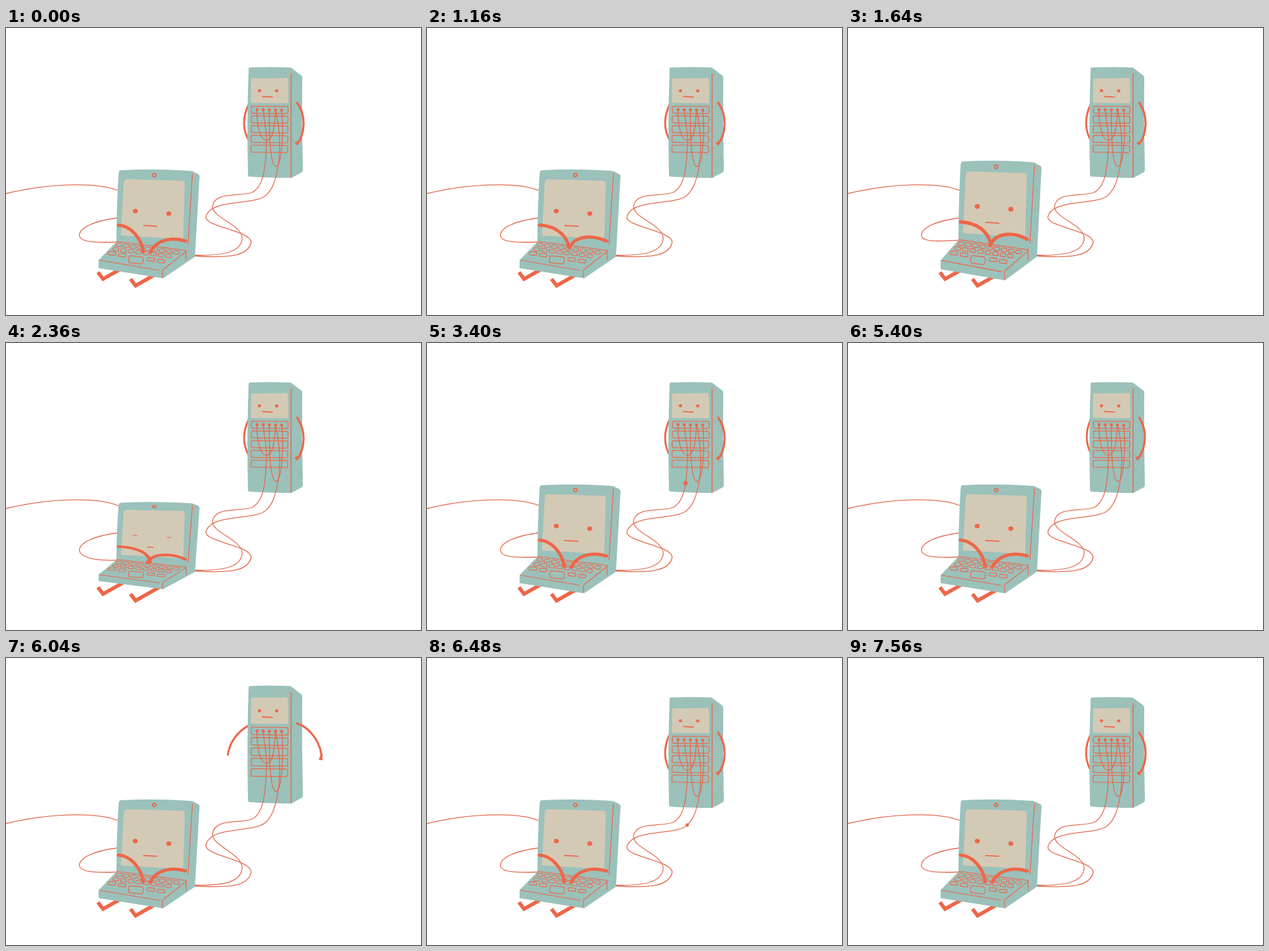
Recreate the animation shown at these times as an HTML page. Size 650 by 450 pixels, loop 7.96 s.

```html
<!DOCTYPE html>
<html lang="en">
<head>
<meta charset="utf-8">
<title>Laptop and server</title>
<style>
  html, body { margin: 0; width: 100%; height: 100%; overflow: hidden; background: #fff; }
  svg { display: block; width: 650px; height: 450px; }
  .body { fill: #9bc1bb; }
  .screen { fill: #d3cab5; stroke: #d3cab5; stroke-width: 4; stroke-linejoin: round; }
  .ink { fill: #ee6648; }
  .line { fill: none; stroke: #ee6648; stroke-width: 1.2; }
  .cable { fill: none; stroke: #e2694c; stroke-width: 1.3; }
  .limb { fill: none; stroke: #ee6648; stroke-width: 5; stroke-linecap: round; }
  .speck { fill: #c1937c; opacity: .55; }
</style>
</head>
<body>
<svg viewBox="0 0 650 450">
  <path class="cable" d="M0,259.5 C60,245 138,240 176,255 L190,264"/>
  <path class="cable" id="loop"/>

  <g id="server">
    <path class="limb" id="armL" stroke-width="3" style="stroke-width:3" d="M380,120 C371,139 371,158 379,174"/>
    <path class="body" d="M381,62 Q414,60.500 446,62 L462,74 Q464,75 464,79 Q463,150 465,222 Q465,226 462,227 L447,235 Q412,235 381,233 Q379,233 379,229 Q377,148 380,64 Z"/>
    <g id="specksS"></g>
    <path class="screen" d="M386,81 L439.500,80.500 L440,116 L385.500,115.500 Z"/>
    <path class="line" style="stroke-width:1.5" d="M446.500,71 V234.500"/>
    <g id="slots"></g>
    <g id="plugs"></g>
    <path class="cable" d="M393,129 C393,160 400,176 408,176 C417,176 421,160 422,129"/>
    <path class="cable" d="M412.500,129 C412,170 414,217 423,217 C432,217 435,165 432,129"/>
    <path class="limb" id="armR" style="stroke-width:3.2" d="M456,117 C470,136 469,165 456,182 L454.500,180.500 L460,177"/>
    <g id="faceS"></g>
  </g>

  <path class="cable" id="cableA"/>
  <path class="cable" id="cableB"/>
  <circle class="ink" id="packet"/>

  <g class="limb" style="stroke-width:5.800;stroke-linecap:butt">
    <path d="M144,383 L152,393.500 L192,371"/>
    <path d="M195,393.500 L203,404 L246,379.500"/>
  </g>

  <g id="laptop">
    <path class="body" d="M180,223 Q235,220 289,224 Q293,224 295,226 L301,229 Q304,231 303,235 L296,357 Q296,359 294,360 L246,392.500 L145,376.500 L145,364 L173,335 Q173,280 176.500,227 Q177,223 180,223 Z"/>
    <g id="specksL"></g>
    <path class="screen" d="M190,239 Q187,239 186.500,242 L182,323.500 Q230,325 275.500,330 L278,244 Q278,241.500 275,241.500 Z"/>
    <path class="line" d="M292,228 L285,340 M173,334.500 L283,349 M146,364 L240,380 M245,379.500 L282,350.500 M245,380 V391.500 M282,348 V364"/>
    <circle class="line" style="stroke-width:1.700" cx="232.300" cy="230.500" r="2.600"/>
    <g id="keys"></g>
    <g id="faceL"></g>
    <path class="limb" id="handL"/>
    <path class="limb" id="handR"/>
  </g>
</svg>
<script>
const LOOP = 7960, STEP = 40;
const $ = id => document.getElementById(id);
const set = (el, attrs) => { for (const k in attrs) el.setAttribute(k, attrs[k]); return el; };
const add = (parent, tag, attrs) =>
  $(parent).appendChild(set(document.createElementNS('http://www.w3.org/2000/svg', tag), attrs));

// Static details
const key = (x, y, w, h, rx = 2.2) => add('keys', 'rect', {
  class: 'line', x: x - w / 2, y: y - h / 2, width: w, height: h, rx,
  transform: `rotate(6 ${x} ${y})`
});
for (let i = 0; i < 9; i++) key(177 + i * 11.25, 340 + i * 1.5, 9, 5);
for (let i = 0; i < 8; i++) key(172 + i * 11.8, 347 + i * 1.5, 9, 5);
[[166, 353.5], [182, 356], [227, 363], [243, 365.5]].forEach(([x, y]) => key(x, y, 12, 5));
key(203.5, 363.5, 23, 11, 3.5);

for (let i = 0; i < 5; i++) {
  add('slots', 'rect', { class: 'line', x: 384, y: 122.8 + i * 15.3, width: 57.5, height: 11, rx: 2.5, transform: 'rotate(.6 412 160)' });
  add('plugs', 'circle', { class: 'ink', cx: 393.3 + i * 9.6, cy: 128 + i * .2, r: 2.4 });
}

let seed = 7;
const rand = () => (seed = seed * 16807 % 2147483647) / 2147483647;
function specks(id, n, x, y, w, h) {
  while (n--) add(id, 'ellipse', {
    class: 'speck', cx: x + rand() * w, cy: y + rand() * h, rx: .4 + rand() * .8, ry: .4 + rand() * .7
  });
}
specks('specksS', 18, 384, 65, 72, 12);
specks('specksS', 24, 449, 77, 13, 145);
specks('specksS', 14, 382, 198, 60, 32);
specks('specksL', 10, 270, 226, 28, 10);
specks('specksL', 10, 293, 236, 7, 60);

// Faces: round eyes that close to short dashes, plus a mouth
function face(id, [x1, y1], [x2, y2], r, [mx, my], mouth, small) {
  const eyes = [[x1, y1], [x2, y2]].map(([cx, cy]) => [
    add(id, 'ellipse', { class: 'ink', cx, cy, rx: r, ry: r * .9 }),
    add(id, 'path', { class: 'line', d: `M${cx - r},${cy} l${2 * r},.6` })
  ]);
  const lips = add(id, 'path', { class: 'line', style: 'stroke-width:1.7' });
  return closed => {
    for (const [open, shut] of eyes) {
      set(open, { visibility: closed ? 'hidden' : 'visible' });
      set(shut, { visibility: closed ? 'visible' : 'hidden' });
    }
    const w = closed ? small : mouth;
    set(lips, { d: `M${mx - w / 2},${my - w * .03} l${w},${w * .06}` });
  };
}
const laptopFace = face('faceL', [202.5, 287], [255, 291], 3.9, [226, 310.3], 22, 10);
const serverFace = face('faceS', [397, 98.3], [424, 98.6], 2.6, [409.5, 107.8], 17, 8);

// Cables, server end first
const BASE = 339;
const cableA = 'M403,129 C405,155 410,165 407.5,190 C406,225 402,250 385,258 C365,265 328,256 323.500,279 C322,298 370,308 370,330 C368,350 345,358 290,356';
const cableB = 'M422.500,129 C429,160 431,190 426,218 C422,240 417,255 405,264 C385,278 318,268 313,297 C314,312 384,318 384,336 C380,356 355,362 290,357';
const pull = (d, s) => d.replace(/,([\d.]+)/g, (m, y) => ',' + (y < BASE ? BASE - (BASE - y) * s : y));

// Fraction of a path's length that lies closest to a point
function near(path, x, y) {
  const len = path.getTotalLength();
  let best = 0, min = 1e9;
  for (let i = 0; i <= 400; i++) {
    const p = path.getPointAtLength(len * i / 400), d = Math.hypot(p.x - x, p.y - y);
    if (d < min) { min = d; best = i / 400; }
  }
  return best;
}
const pathA = set($('cableA'), { d: cableA }), pathB = set($('cableB'), { d: cableB });

// Tracks of [ms, value]
const laptopScale = [[1240, 1], [1760, 1.115], [2000, 1.115], [2200, .8], [2480, .8], [2680, 1.06], [2920, 1],
  [6960, 1], [7080, .88], [7240, 1.07], [7400, .97], [7520, 1]];
const handRaise = [[1000, 0], [1160, 1], [2320, 1.6], [2480, 1.6], [2800, 0]];
const typing = [[440, 0], [520, 1], [1000, 1], [1160, 0]];
const serverScale = [[3680, 1], [3840, 1.097], [4000, .95], [4120, 1.02], [4200, 1],
  [5400, 1], [5520, .95], [5800, 1.065], [6040, 1.065], [6200, .92], [6320, .92], [6440, 1]];
const armSwing = [[3680, 0], [3840, 17], [4200, 0],
  [5360, 0], [5400, -2], [5480, -4], [5800, 36], [6040, 36], [6160, 40], [6440, 0]];
const sendUp = [[2480, 1], [2820, near(pathA, 370, 328)], [3400, near(pathA, 404, 220)],
  [3600, near(pathA, 408, 169)], [3760, 0]];
const sendDown = [[6240, 0], [6480, near(pathB, 408, 262)], [6820, near(pathB, 384, 336)], [6980, 1]];

const smooth = u => u * u * (3 - 2 * u);
function at(track, t, ease = smooth) {
  let i = track.findIndex(k => k[0] > t);
  if (i < 0) return track[track.length - 1][1];
  if (!i) return track[0][1];
  const [t0, a] = track[i - 1], [t1, b] = track[i];
  return a + (b - a) * ease((t - t0) / (t1 - t0));
}
const scaleAbout = (y, s) => `translate(0 ${y}) scale(1 ${s}) translate(0 ${-y})`;

function drawPacket(t) {
  let dot = { r: 0 };
  for (const [path, track, r] of [[pathA, sendUp, 3.4], [pathB, sendDown, 2.6]]) {
    if (t < track[0][0] || t >= track[track.length - 1][0]) continue;
    const p = path.getPointAtLength(path.getTotalLength() * at(track, t, u => u));
    dot = { cx: p.x, cy: p.y, r };
  }
  set($('packet'), dot);
}

function draw(t) {
  const ls = at(laptopScale, t), ss = at(serverScale, t), swing = at(armSwing, t);
  set($('laptop'), { transform: scaleAbout(360, ls) });
  set($('server'), { transform: scaleAbout(BASE, ss) });
  set(pathA, { d: pull(cableA, ss) });
  set(pathB, { d: pull(cableB, ss) });
  laptopFace(ls < .93);
  serverFace(ss < .94);

  const endY = 360 - 24.5 * ls;
  set($('loop'), { d: `M190,296 L173,298 C135,303 115,314 115,325 C116,336 140,${endY + 1.5} 173,${endY} L190,${endY}` });

  const k = at(handRaise, t), tap = 9 * at(typing, t) * Math.sin((t - 440) / 160 * 2 * Math.PI);
  const lx = 215 + 7 * k, ly = 351 - 7 * k + tap, rx = 226 - 3 * k, ry = 351.5 - 7 * k - tap;
  set($('handL'), { d: `M176,309 C${196 + 3 * k},310 ${lx - 3},${ly - 21} ${lx},${ly}` });
  set($('handR'), { d: `M281,334 C262,${328 - 3 * k} ${rx + 10},${ry - 21} ${rx},${ry}` });

  set($('armR'), { transform: `rotate(${-swing} 456 117)` });
  set($('armL'), { transform: `rotate(${swing} 380 120)` });
  drawPacket(t);
}

const start = performance.now();
function tick() {
  const t = (performance.now() - start) % LOOP;
  draw(Math.floor(t / STEP) * STEP);
  requestAnimationFrame(tick);
}
tick();
</script>
</body>
</html>
```
